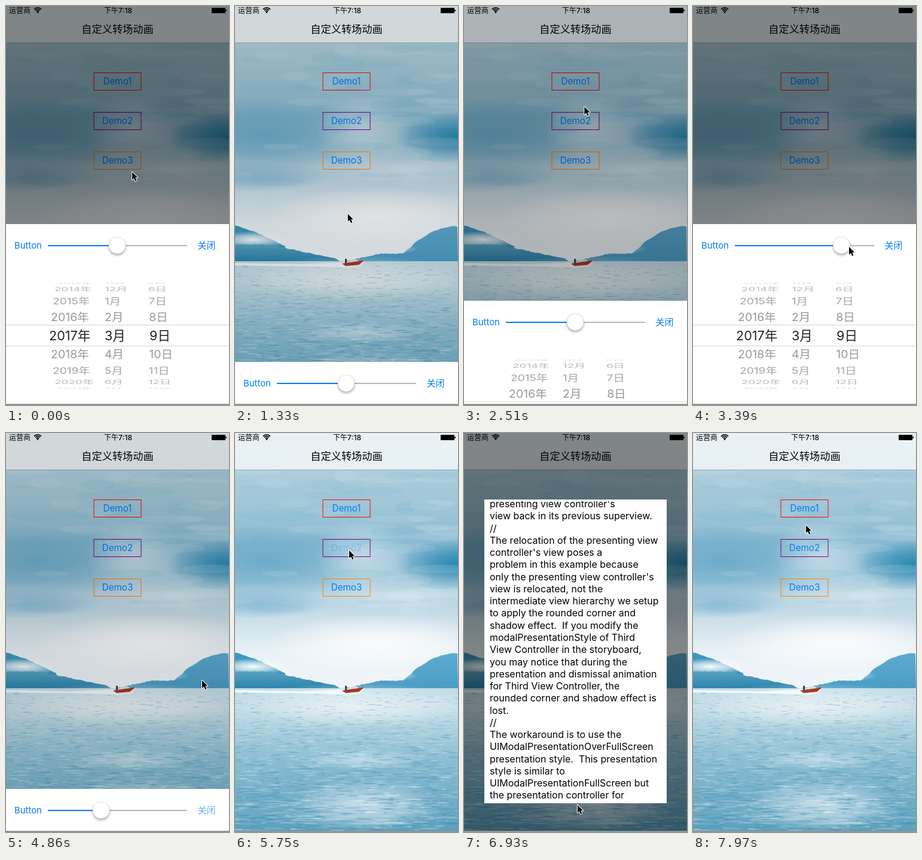
Recreate the animation shown at these times as an HTML page with a canvas. Size 373 by 666 pixels, loop 8 s.

```html
<!DOCTYPE html>
<html lang="zh">
<meta charset="utf-8">
<style>
  html, body { margin: 0; height: 100%; overflow: hidden; }
  canvas { display: block; }
</style>
<canvas id="stage" width="373" height="666"></canvas>
<script>
const W = 373, H = 666, LOOP = 8000, STEP = 147.5, HORIZON = 427;
const BLUE = '#007aff';
let ctx;

// Pointer stops: [step, x, y]
const stops = [
  [0, 210, 276], [6, 187, 359], [8, 187, 359], [15, 201, 124], [16, 201, 124],
  [20, 197, 401], [23, 260, 401], [28, 170, 408], [30, 331, 416], [33, 327, 412],
  [39, 190, 195], [41, 192, 236], [43, 203, 444], [44, 203, 444], [47, 189, 620],
  [50, 189, 620], [54, 188, 153]];

const clamp = u => Math.min(1, Math.max(0, u));
const easeOut = (n, from, to) => 1 - (1 - clamp((n - from) / (to - from))) ** 2.1;

function pointerAt(n) {
  const i = Math.max(1, stops.findIndex(s => s[0] >= n));
  const [n0, x0, y0] = stops[i - 1], [n1, x1, y1] = stops[i];
  const u = (n - n0) / (n1 - n0), e = u * u * (3 - 2 * u);
  return [x0 + (x1 - x0) * e, y0 + (y1 - y0) * e];
}

let seed = 7;
const random = (min = 0, max = 1) => {
  seed = seed * 16807 % 2147483647;
  return min + (max - min) * seed / 2147483647;
};

function rect(x, y, w, h, fill) {
  ctx.fillStyle = fill;
  ctx.fillRect(x, y, w, h);
}

function ellipse(x, y, rx, ry, fill) {
  ctx.beginPath();
  ctx.ellipse(x, y, rx, ry, 0, 0, 7);
  ctx.fillStyle = fill;
  ctx.fill();
}

function text(s, x, y, size, fill = '#000', align = 'left', weight = 400) {
  ctx.font = `${weight} ${size}px Inter, "Noto Sans CJK SC", sans-serif`;
  ctx.textAlign = align;
  ctx.fillStyle = fill;
  ctx.fillText(s, x, y);
}

function shape(points, fill) {
  ctx.beginPath();
  for (let i = 0; i < points.length; i += 2) ctx.lineTo(points[i], points[i + 1]);
  ctx.closePath();
  ctx.fillStyle = fill;
  ctx.fill();
}

function gradient(y0, y1, ...colors) {
  const g = ctx.createLinearGradient(0, y0, 0, y1);
  colors.forEach((c, i) => g.addColorStop(i / (colors.length - 1), c));
  return g;
}

// Soft elliptical patch of cloud, mist or light
function blob(x, y, rx, ry, rgb, alpha) {
  const g = ctx.createRadialGradient(0, 0, 0, 0, 0, 1);
  [1, .6, 0].forEach((a, i) => g.addColorStop(i / 2, `rgba(${rgb},${alpha * a})`));
  ctx.save();
  ctx.translate(x, y);
  ctx.scale(rx, ry);
  rect(-1, -1, 2, 2, g);
  ctx.restore();
}

// Hill whose height above the water is given by height(u), u from 0 to 1
function hill(x0, x1, height, fill) {
  const points = [x0, HORIZON];
  for (let x = x0; x <= x1; x += 4) {
    points.push(x, HORIZON - height((x - x0) / (x1 - x0)) + random(-.8, .8));
  }
  shape([...points, x1, HORIZON], fill);
}

function paintSky() {
  rect(0, 0, W, HORIZON, gradient(0, HORIZON,
    '#b5d2dd', '#aecedb', '#9fc6d7', '#8cbbd2', '#a3c8da', '#c8dde8', '#e9f1f6', '#f0f5f8'));
  blob(50, 215, 170, 60, '85,160,195', .65);
  blob(30, 285, 130, 25, '105,170,205', .55);
  blob(373, 218, 105, 40, '20,125,172', .85);
  blob(215, 205, 80, 70, '205,224,234', .75);
  blob(270, 272, 150, 26, '205,224,234', .8);
  blob(240, 352, 190, 50, '250,252,254', 1);
  for (let i = 0; i < 70; i++) {
    const rgb = i % 2 ? '110,175,203' : '212,229,237';
    ellipse(random(0, W), random(65, 300), random(15, 70), random(3, 10), `rgba(${rgb},.13)`);
  }
}

function paintHills() {
  hill(0, 84, u => 60 - 34 * u ** 1.3, '#3d96bd');
  blob(30, 390, 65, 14, '248,251,253', 1);
  hill(0, 176, u => 32 * (1 - u) ** .6 + 4 * Math.sin(u * 7 - 1) * (1 - u),
    gradient(392, HORIZON, '#63a9c8', '#2983ac'));
  hill(180, W, u => 14 * clamp(3 * u) + 45 * easeOut(u, .53, 1),
    gradient(368, HORIZON, '#5daad0', '#4a9dc6'));
  blob(262, 405, 45, 9, '240,246,250', .7);
}

function paintWater() {
  rect(0, HORIZON - 1, W, H, gradient(HORIZON, H,
    '#c3dde8', '#c3dce7', '#add0de', '#95c3d6', '#84b9cf', '#76b0c9', '#6daac4', '#5a9fbc'));
  blob(200, 455, 200, 38, '238,245,248', .8);
  blob(210, 545, 110, 18, '222,236,243', .6);
  blob(215, 622, 130, 45, '222,234,241', .8);
  // Ripples grow towards the viewer
  for (let i = 0; i < 1500; i++) {
    const depth = random(), long = random(2, 6 + depth * 15);
    const fill = i % 2 ? 'rgba(240,248,251,.26)' : 'rgba(45,135,172,.26)';
    ellipse(random(0, W), 433 + depth * 232, long, random(.3, .6 + depth), fill);
  }
}

function paintBoat() {
  shape([0, 429, 110, 431, 180, 428, 200, 437, 130, 435, 0, 433], 'rgba(250,252,253,.85)');
  shape([179, 431, 217, 424, 211, 435, 196, 437], '#f3eeee');
  shape([179, 430, 217, 424, 207, 432, 185, 434], '#a03a28');
  shape([188, 428, 192, 424, 204, 423, 207, 426], '#d9dfe2');
  rect(184, 422, 3, 7, '#3a3f48');
}

function paintBackdrop() {
  paintSky();
  paintHills();
  paintWater();
  paintBoat();
  rect(0, 0, W, 61, 'rgba(250,252,253,.76)');
  rect(0, 61, W, 1, '#93adb9');
}

function drawScreen(pressed) {
  ctx.drawImage(backdrop, 0, 0);
  text('运营商', 5, 11.5, 12);
  text('下午7:18', 187.5, 11.5, 12, '#000', 'center', 500);
  ctx.strokeStyle = '#000';
  ctx.lineWidth = 1.7;
  for (const r of [3, 5.8, 8.6]) {
    ctx.beginPath();
    ctx.arc(53, 11.5, r, -Math.PI * .75, -Math.PI * .25);
    ctx.stroke();
  }
  ellipse(53, 10.8, 1.2, 1.2, '#000');
  rect(344, 3, 23, 9, '#000');
  rect(367.5, 6, 1.5, 3, '#000');
  text('自定义转场动画', 186.5, 45, 17.2, '#000', 'center', 500);

  ['#f00', '#800080', '#ff8000'].forEach((color, i) => {
    const y = 111.5 + 66 * i;
    ctx.strokeStyle = color;
    ctx.lineWidth = 1;
    ctx.strokeRect(147, y, 79, 29);
    ctx.globalAlpha = pressed === i ? .28 : 1;
    text('Demo' + (i + 1), 186.5, y + 19.5, 15.2, BLUE, 'center');
    ctx.globalAlpha = 1;
  });
}

// One wheel row, wrapped on a cylinder; k counts from the selected row
function drawPickerRow(k) {
  const angle = k * .36, far = Math.abs(k);
  const size = k ? 19.8 - far * .3 : 21.6;
  const gray = k ? 148 + far * far * 4 : 34;
  const row = { [2017 + k + '年']: 72 + far * 3, [(k + 14) % 12 + 1 + '月']: 165, [9 + k + '日']: 240 - far * .7 };
  ctx.save();
  ctx.translate(0, 186.5 + 88 * Math.sin(angle));
  ctx.scale(1, Math.cos(angle));
  for (const s in row) text(s, row[s], size * .365, size, `rgb(${gray},${gray},${gray})`);
  ctx.restore();
}

function drawSheet(y, thumb, closeAlpha) {
  ctx.save();
  ctx.translate(0, y);
  rect(0, 0, W, 302, '#fff');
  text('Button', 14, 41, 14.9, BLUE);
  ctx.globalAlpha = closeAlpha;
  text('关闭', 320.5, 41, 15, BLUE);
  ctx.globalAlpha = 1;
  rect(70, 35, 233, 2, '#b7b7b7');
  rect(70, 35, thumb - 70, 2, BLUE);
  ctx.save();
  ctx.shadowColor = 'rgba(0,0,0,.35)';
  ctx.shadowBlur = 4;
  ctx.shadowOffsetY = 2.5;
  ellipse(thumb, 35.5, 14, 14, '#fff');
  ctx.restore();
  ctx.lineWidth = .5;
  ctx.strokeStyle = '#ccc';
  ctx.stroke();
  for (let k = -4; k <= 4; k++) drawPickerRow(k);
  for (const line of [168, 203]) rect(0, line, W, 1, '#d4d4d4');
  ctx.restore();
}

const article = `presenting view controller's
view back in its previous superview.
//
The relocation of the presenting view
controller's view poses a
problem in this example because
only the presenting view controller's
view is relocated, not the
intermediate view hierarchy we setup
to apply the rounded corner and
shadow effect.  If you modify the
modalPresentationStyle of Third
View Controller in the storyboard,
you may notice that during the
presentation and dismissal animation
for Third View Controller, the
rounded corner and shadow effect is
lost.
//
The workaround is to use the
UIModalPresentationOverFullScreen
presentation style.  This presentation
style is similar to
UIModalPresentationFullScreen but
the presentation controller for`.split('\n');

function drawModal(alpha) {
  ctx.save();
  ctx.globalAlpha = alpha;
  rect(34, 111, 305, 507, '#fff');
  ctx.beginPath();
  ctx.rect(34, 114, 305, 504);
  ctx.clip();
  article.forEach((line, i) => text(line, 43, 124 + i * 20.27, 16));
  ctx.restore();
}

function drawPointer(x, y) {
  ctx.save();
  ctx.translate(x, y);
  ctx.lineJoin = 'round';
  shape([1, 1, 1, 14, 4, 11.2, 6.2, 16.2, 8.4, 15.2, 6.3, 10.3, 10.2, 10.3], '#000');
  ctx.strokeStyle = '#fff';
  ctx.lineWidth = 2;
  ctx.stroke();
  ctx.fill();
  ctx.restore();
}

function draw(time) {
  const n = Math.floor((time % LOOP + 10) / STEP);
  const sheet = 1 - easeOut(n, 8, 10) + easeOut(n, 16, 19) - easeOut(n, 32, 34);
  const modal = easeOut(n, 39, 41) - easeOut(n, 49, 51);
  const thumb = 186 + 66 * easeOut(n, 20, 24) - 93 * easeOut(n, 24, 28);
  const closeAlpha = n < 32 ? 1 : .3 * (n - 31);
  const pressed = n === 15 || n === 16 ? 0 : n === 39 ? 1 : -1;

  drawScreen(pressed);
  rect(0, 0, W, H, `rgba(0,0,0,${.45 * Math.max(sheet, modal)})`);
  if (sheet > 0) drawSheet(664 - 300 * sheet, thumb, closeAlpha);
  if (modal > 0) drawModal(modal);
  rect(0, 664, W, 2, '#90979a');
  drawPointer(...pointerAt(n));
  requestAnimationFrame(draw);
}

const backdrop = document.createElement('canvas');
backdrop.width = W;
backdrop.height = H;
ctx = backdrop.getContext('2d');
paintBackdrop();
ctx = document.getElementById('stage').getContext('2d');
requestAnimationFrame(draw);
</script>
</html>
```
